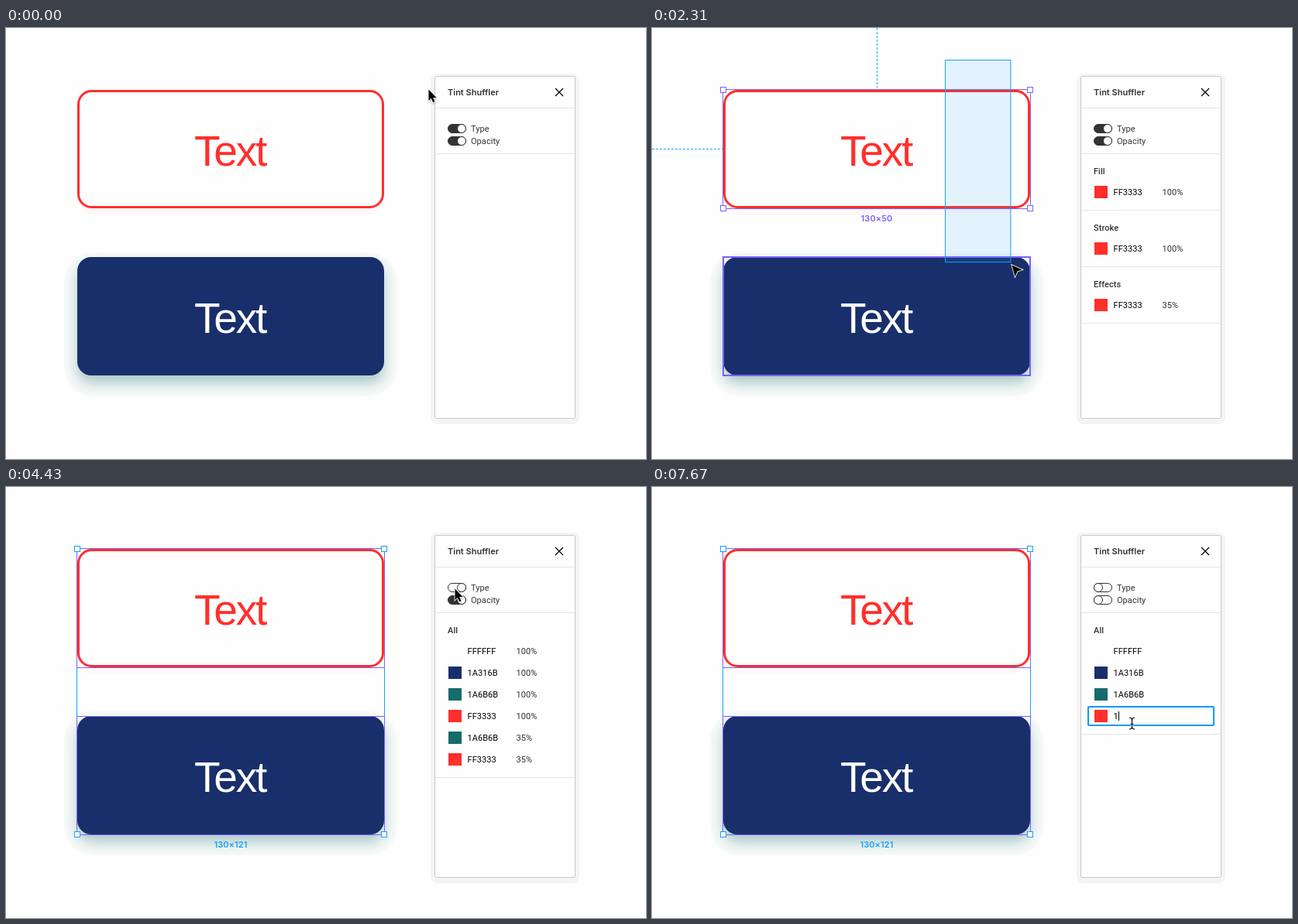
These frames come from a looping animation (826 px wide and 557 px high, 8 s). An HTML page:

```html
<!DOCTYPE html>
<html lang="en">
<head>
<meta charset="utf-8">
<title>Tint Shuffler</title>
<style>
  html, body { margin: 0; width: 100%; height: 100%; overflow: hidden; background: #fefefe; }
  svg { display: block; width: 100%; height: 100%; }
  .label { font: 55px "Liberation Sans", Arial, sans-serif; letter-spacing: -2.2px; text-anchor: middle; }
  .title { font: 600 11px Inter, sans-serif; fill: #333; }
  .size { font: 600 11px Inter, sans-serif; letter-spacing: .1px; text-anchor: middle; }
  .ui { font: 11px Roboto, sans-serif; letter-spacing: .055px; fill: #333; }
  .head { font-weight: 500; }
  .hex { fill: #000; }
  .rule { stroke: #e5e5e5; }
</style>
</head>
<body>
<svg viewBox="0 0 826 557">
  <defs>
    <filter id="glow" x="-20%" y="-30%" width="140%" height="160%"><feGaussianBlur stdDeviation="8.5"/></filter>
    <filter id="soft" x="-50%" y="-50%" width="200%" height="200%"><feDropShadow dx="0" dy="1" stdDeviation="1" flood-opacity=".35"/></filter>
  </defs>

  <rect x="94" y="92" width="392" height="150" rx="22" fill="#fff8f8"/>
  <rect x="93.5" y="81.5" width="393" height="150" rx="17" fill="#fefefe" stroke="#ff2f2b" stroke-width="3"/>
  <text class="label" x="289" y="178" fill="#ff2f2b">Text</text>

  <rect x="75" y="290" width="430" height="186" rx="38" fill="#f7faf9"/>
  <rect x="92" y="306" width="396" height="153" rx="18" fill="#1a6b6b" opacity=".35" filter="url(#glow)"/>
  <rect x="92" y="296" width="396" height="153" rx="18" fill="#182f6b"/>
  <text class="label" x="289" y="394" fill="#fff">Text</text>

  <g id="selection"></g>

  <rect x="548" y="59" width="192" height="453" rx="9" fill="#f4f4f4"/>
  <rect x="553.5" y="62.5" width="181" height="442" rx="2" fill="#fefefe" stroke="#c8c8c8"/>
  <text class="title" x="570" y="87">Tint Shuffler</text>
  <path d="M709 78l10 10m0-10l-10 10" stroke="#000" stroke-width="1.2"/>
  <path class="rule" d="M554 103.5H734M554 162.5H734"/>
  <text class="ui" x="600" y="134">Type</text>
  <text class="ui" x="600" y="150">Opacity</text>

  <g id="panel"></g>
  <g id="pointer"></g>
</svg>
<script>
const LOOP = 8000;
const BLUE = '#18a0fb', PURPLE = '#7b61ff', PINK = '#ff00ff';
const SWATCH = { FFFFFF: '#fefefe', '1A316B': '#182f6b', '1A6B6B': '#166b6b', FF3333: '#ff2f2b' };

// Time, duration, number of visible steps, then end point and optional curve control point.
const MOVES = [
  { from: 50, to: 540, steps: 9, end: [378, 44], bend: [470, 20] },
  { from: 890, to: 1430, steps: 10, end: [404.5, 239.5] },
  { from: 1790, to: 2370, steps: 10, end: [466, 308] },
  { from: 3030, to: 3830, steps: 13, end: [579, 131] },
  { from: 4550, to: 4720, steps: 4, end: [578.5, 141] },
  { from: 4900, to: 5010, steps: 3, end: [578, 145] },
  { from: 6440, to: 6950, steps: 9, end: [615, 296.5] }
];

function progress(t, from, to, steps) {
  const u = Math.min(1, Math.max(0, (t - from) / (to - from)));
  const k = Math.floor(u * (steps - 1) + 1e-6) / (steps - 1);
  return k * k * (3 - 2 * k);
}

function pointerAt(t) {
  let p = [545, 79];
  for (const m of MOVES) {
    if (t < m.from) break;
    const k = progress(t, m.from, m.to, m.steps);
    p = p.map((a, i) => {
      const b = m.end[i], c = m.bend ? m.bend[i] : (a + b) / 2;
      return (1 - k) ** 2 * a + 2 * k * (1 - k) * c + k * k * b;
    });
  }
  return p;
}

const box = (x1, y1, x2, y2, color, width = 1, fill = 'none') =>
  `<rect x="${x1}" y="${y1}" width="${x2 - x1}" height="${y2 - y1}" fill="${fill}" stroke="${color}" stroke-width="${width}"/>`;

function bounds(bottom, color, size) {
  let out = box(91.5, 79.5, 488.5, bottom, color);
  if (bottom > 300) out += box(91.5, 79.5, 488.5, 233.5, PURPLE) + box(91.5, 296.5, 488.5, bottom, PURPLE);
  for (const x of [92, 488])
    for (const y of [80, bottom - .5])
      out += box(x - 3.5, y - 3.5, x + 3.5, y + 3.5, color, 1, '#fff');
  return out + `<text class="size" x="290" y="${bottom + 16}" fill="${color}">${size}</text>`;
}

const ring = y =>
  `<circle cx="290" cy="${y}" r="5" fill="none" stroke="${PINK}" stroke-width="1.2"/>
   <circle cx="290" cy="${y}" r="2.8" fill="none" stroke="${PINK}" stroke-width="1"/>`;

function selection(t, [x, y]) {
  let out = '';
  const cx = x - .5, cy = y - 2.5;
  const dragging = t >= 890 && t < 2670;
  if (dragging && cy > 80) {
    out += `<path d="M290.5 0V77M0 156.5H91" stroke="${BLUE}" stroke-dasharray="3 2"/>`;
    out += bounds(233.5, PURPLE, '130×50');
    if (cy > 296) out += box(92, 296, 488, 449, PURPLE, 2);
  }
  if (dragging) out += box(378.5, 41.5, Math.max(cx, 379) - .5, Math.max(cy, 42) - .5, BLUE, 1, 'rgba(24,160,251,.12)');
  if (t >= 2670) out += bounds(449.5, BLUE, '130×121');
  if (t >= 2850 && x < 488) out += ring(157) + ring(373) + `<path d="M284 264.5H297" stroke="${PINK}"/>`;
  return out;
}

function toggle(y, t, click) {
  const on = t < click;
  const cx = 588 - 12 * progress(t, click, click + 120, 3);
  return `<rect x="570.5" y="${y - 5.5}" width="23" height="11" rx="5.5" fill="${on ? '#333' : '#fefefe'}" stroke="#333"/>
    <circle cx="${cx}" cy="${y}" r="5.5" fill="#fefefe" stroke="#333"/>`;
}

function sections(list, typed) {
  let top = 162, out = '';
  for (const [name, ...rows] of list) {
    out += `<text class="ui head" x="570" y="${top + 27}">${name}</text>`;
    rows.forEach((row, i) => {
      const [hex, alpha = ''] = row.split(' '), y = top + 50 + 28 * i;
      const shown = typed && hex === 'FF3333' ? '1' : hex;
      out += `<rect x="571" y="${y - 8}" width="17" height="16" fill="${SWATCH[hex]}"/>
        <text class="ui hex" x="595.5" y="${y + 4}">${shown}</text>
        <text class="ui" x="658.5" y="${y + 4}">${alpha}</text>`;
    });
    top += 45 + 28 * rows.length;
    out += `<path class="rule" d="M554 ${top + .5}H734"/>`;
  }
  return out;
}

function colorList(t) {
  if (t < 1610) return [];
  if (t < 2670) return [['Fill', 'FF3333 100%'], ['Stroke', 'FF3333 100%'], ['Effects', 'FF3333 35%']];
  if (t < 4430) return [
    ['Fill', 'FFFFFF 100%', '1A316B 100%', 'FF3333 100%'],
    ['Stroke', '1A6B6B 100%', 'FF3333 100%'],
    ['Effects', '1A6B6B 35%', 'FF3333 35%']];
  if (t < 5730) return [['All', 'FFFFFF 100%', '1A316B 100%', '1A6B6B 100%', 'FF3333 100%', '1A6B6B 35%', 'FF3333 35%']];
  return [['All', 'FFFFFF', '1A316B', '1A6B6B', 'FF3333']];
}

function panel(t, [, y]) {
  const typed = t >= 7670;
  let out = toggle(130, t, 4430) + toggle(146, t, 5730) + sections(colorList(t), typed);
  if (t > 6440 && y > 283)
    out += `<rect x="563" y="284" width="162" height="24" rx="1" fill="none" stroke="#0d99ff" stroke-width="2"/>`;
  if (typed) out += '<path d="M602.5 290V302" stroke="#000"/>';
  return out;
}

function pointer(t, [x, y]) {
  if (t >= 7130) {
    const beam = 'M616 298q3 0 3.5 2.500q.5-2.500 3.500-2.500M619.500 300V311M616 313q3 0 3.500-2.500q.5 2.500 3.500 2.500M617.500 306.500h4';
    return `<path d="${beam}" fill="none" stroke="#fff" stroke-width="3"/><path d="${beam}" fill="none" stroke="#000" stroke-width="1.200"/>`;
  }
  const arrow = t < 720 || x > 549;
  const shape = arrow ? 'M.5 .5V15L3.800 12L6.200 17.300L8.500 16.300L6.200 11H10.700Z' : 'M.5 .5L14 6.800L7.800 8.800L4.600 15.500Z';
  return `<path transform="translate(${x} ${y})" d="${shape}" fill="#000" stroke="#fff" stroke-width="1.600" paint-order="stroke" filter="url(#soft)"/>`;
}

const layers = [selection, panel, pointer].map(draw => ({ draw, node: document.getElementById(draw.name), last: null }));

function frame() {
  const t = performance.now() % LOOP, tip = pointerAt(t);
  for (const layer of layers) {
    const markup = layer.draw(t, tip);
    if (markup !== layer.last) layer.node.innerHTML = layer.last = markup;
  }
  requestAnimationFrame(frame);
}
frame();
</script>
</body>
</html>
```
